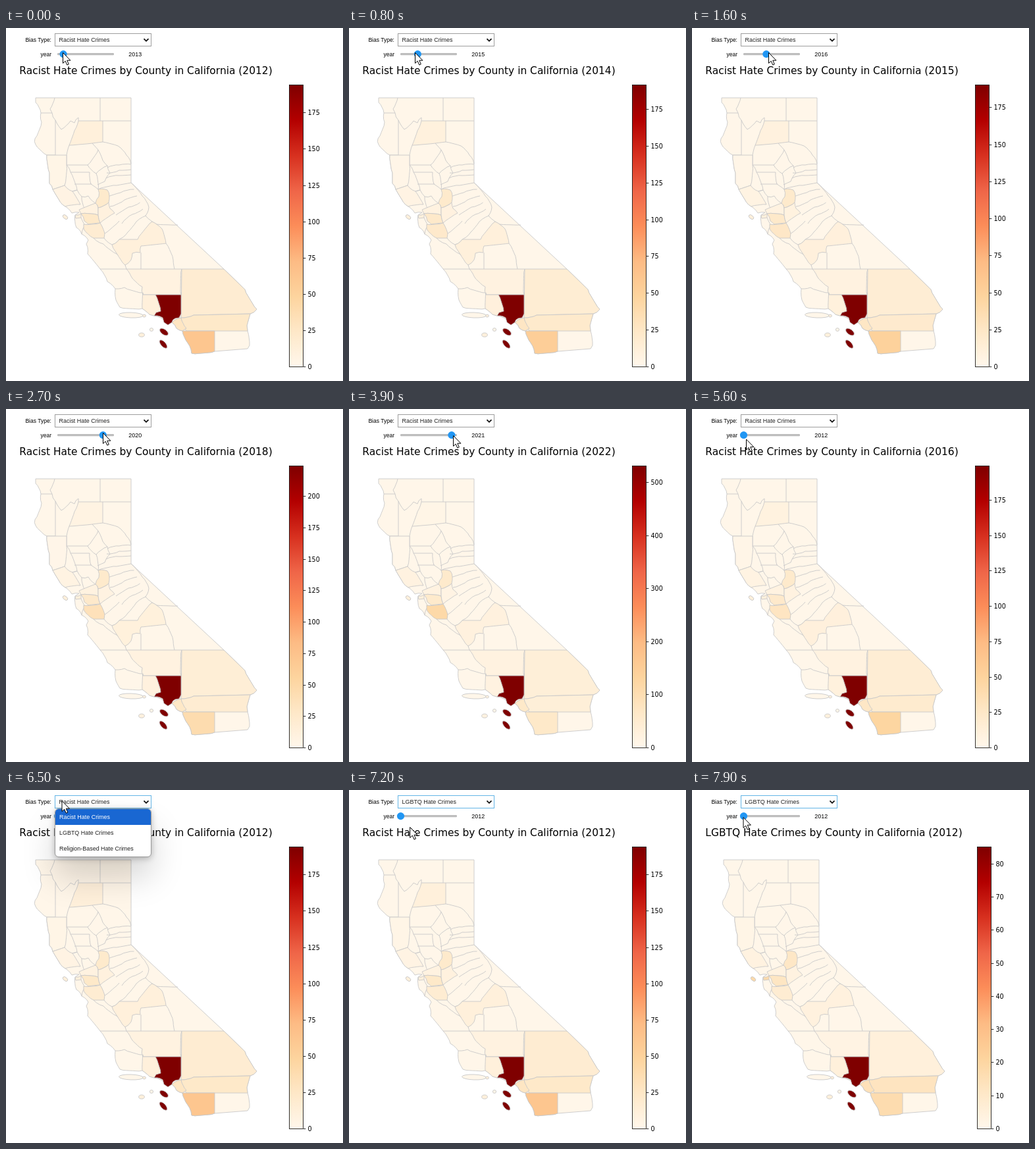
An HTML page that plays this animation: 512 by 536 pixels, repeating every 8000 ms.

```html
<!DOCTYPE html>
<html lang="en">
<head>
<meta charset="utf-8">
<title>County map</title>
<style>
  html, body { margin: 0; width: 100%; height: 100%; overflow: hidden; background: #fff; }
  svg { position: absolute; left: 0; top: 0; }
  .ui, .menu { font-family: "Liberation Sans", Arial, sans-serif; font-size: 8.95px; }
  .label { font-size: 8.5px; text-anchor: end; }
  .plot { font-family: "DejaVu Sans", sans-serif; font-size: 9.65px; }
  #title { font-size: 15.44px; text-anchor: middle; }
  #map { stroke: #c9c9c9; stroke-width: .9; stroke-linejoin: round; }
  .menu {
    position: absolute; left: 74px; top: 28px; width: 145px; height: 72px;
    border: .6px solid #999; border-radius: 6px; overflow: hidden; background: #fff;
    box-shadow: 0 30px 50px rgba(0, 0, 0, .17), 0 2px 10px rgba(0, 0, 0, .25);
  }
  .menu div { height: 24px; line-height: 24px; padding-left: 6px; color: #222; }
  .menu .on { background: #1967d2; color: #fff; }
</style>
</head>
<body>
<svg width="512" height="536" viewBox="0 0 512 536">
  <defs><linearGradient id="ramp" x1="0" y1="1" x2="0" y2="0"></linearGradient></defs>
  <g class="ui">
    <text class="label" x="69" y="21">Bias Type:</text>
    <text class="label" x="69" y="43">year</text>
    <rect id="box" x="74.5" y="8.5" width="146" height="19" fill="#fff"/>
    <text id="choice" x="80.5" y="21" fill="#222"></text>
    <path d="M209.5 16.3l3.5 3.5 3.5-3.5" fill="none" stroke="#111" stroke-width="1.8"/>
    <rect x="78" y="38" width="86" height="3.2" rx="1.2" fill="#bdbdbd"/>
    <circle id="knob" cy="39.6" r="5.6" fill="#2196f3"/>
    <text id="value" x="186.3" y="43"></text>
  </g>
  <g class="plot" id="plot">
    <text id="title" x="212.5" y="69.8"></text>
    <g id="map"></g>
    <rect x="430.5" y="86.5" width="21" height="428" fill="url(#ramp)" stroke="#000" stroke-width=".8"/>
    <g id="ticks"></g>
  </g>
</svg>
<div class="menu" id="menu"></div>
<svg width="512" height="536" viewBox="0 0 512 536">
  <path id="cursor" d="M0 0V16L3.7 12.7 6.3 18.6 8.8 17.5 6.3 11.7H11.4Z" fill="#fff" stroke="#000" stroke-width="1"/>
</svg>
<script>
const $ = id => document.getElementById(id);
const LOOP = 8000, STEP = 100;
const RELEASE = 5600, OPEN = 6400, HOVER = 6800, PICK = 7100, REDRAW = 7400;
const kinds = ['Racist', 'LGBTQ', 'Religion-Based'].map(k => k + ' Hate Crimes');
const mix = (a, b, k) => a + (b - a) * k;

// Linear interpolation through [position, ...values] keys, clamped at both ends.
function track(keys, at) {
  const i = keys.findIndex(k => k[0] > at);
  if (i < 1) return (i ? keys[keys.length - 1] : keys[0]).slice(1);
  const a = keys[i - 1], b = keys[i], k = (at - a[0]) / (b[0] - a[0]);
  return a.slice(1).map((v, n) => mix(v, b[n + 1], k));
}

const pointer = [[100, 86.5, 37.5], [1600, 116.5, 37.5], [2700, 147.5, 36.5], [3200, 166, 38], [3900, 158.5, 40.5],
  [RELEASE, 82.5, 46], [6200, 85, 16.5], [6600, 85, 16.5], [7000, 100, 64], [7600, 78, 41.5]];
const plotYear = [[0, 2012], [1600, 2015], [2700, 2018], [3800, 2022], [5600, 2016], [6400, 2012]];
const plotMax = [[2012, 194], [2015, 190], [2016, 199], [2018, 224], [2022, 531]];

const ramp = ['#fff7ec', '#fee8c8', '#fdd49e', '#fdbb84', '#fc8d59', '#ef6548', '#d7301f', '#b30000', '#7f0000'];
const rgb = hex => [1, 3, 5].map(i => parseInt(hex.slice(i, i + 2), 16));
const shade = percent =>
  `rgb(${track(ramp.map((c, i) => [i * 12.5, ...rgb(c)]), percent).map(Math.round)})`;

// Natural borders get a repeatable wobble; long or axis-aligned ones stay straight.
function edge(a, b) {
  const swap = a[0] > b[0], [p, q] = swap ? [b, a] : [a, b];
  const dx = q[0] - p[0], dy = q[1] - p[1], length = Math.hypot(dx, dy);
  if (!dx || !dy || length > 40) return [a];
  const n = Math.max(1, Math.round(length / 5)), inner = [];
  for (let i = 1; i < n; i++) {
    const noise = Math.sin(p[0] * 12.9 + p[1] * 78.2 + i * 37.7) * 1.2;
    inner.push([p[0] + dx * i / n - dy / length * noise, p[1] + dy * i / n + dx / length * noise]);
  }
  return [a, ...(swap ? inner.reverse() : inner)];
}
function shape(text, closed) {
  const pts = text.split(' ').map(p => p.split(',').map(Number));
  const next = i => pts[(i + 1) % pts.length];
  const out = pts.flatMap((p, i) => closed || i < pts.length - 1 ? edge(p, next(i)) : [p]);
  return `<path d="M${out.map(p => p.map(v => +v.toFixed(1))).join(' ')}${closed ? 'Z' : ''}"/>`;
}
const island = (x, y, rx, ry, turn = 0) =>
  `<ellipse rx="${rx}" ry="${ry}" transform="translate(${x} ${y}) rotate(${turn})"/>`;

const state = '45,106 190,106 190,235 331,366 363,397 381,427 371,434 366,452 367,460 370,482 367,487 317,491 '
  + '282,494 276,478 268,460 259,456 252,447 240,443 225,437 218,435 207,426 173,424 167,413 166,396 154,385 '
  + '143,366 124,343 122,328 125,322 115,313 107,303 105,284 111,280 100,281 90,271 80,260 71,245 66,236 66,220 '
  + '62,193 45,177 44,168 54,143 53,129 45,113';

// Outline, then the share of the maximum in 2012, in 2022 and for the second kind.
const counties = [
  ['62,193 92,193 92,208 89,239 71,245 66,236 66,220', 2, 1, 2],
  ['71,245 89,239 101,248 113,268 90,271 80,260', 3, 4, 4],
  ['110,141 147,141 147,173 131,175 96,178 104,156', 6, 2, 1],
  ['111,276 136,266 140,273 140,284 114,282', 4, 4, 4],
  ['114,282 140,284 143,296 125,298 119,293', 12, 11, 14],
  ['118,298 143,296 150,312 149,319 133,319 118,305', 9, 22, 9],
  ['140,245 154,246 157,255 156,265 140,273 136,266 141,256', 11, 11, 13],
  ['140,273 156,265 158,274 165,281 143,296 140,284', 5, 3, 4],
  ['105,284 114,282 114,288 106,289', 6, 6, 21, island(90, 287, 4.3, 2.6, 40)],
  ['161,329 172,321 200,321 222,294 237,305 243,327 205,331 204,341 192,342 190,352 181,360', 6, 5, 5],
  ['183,366 267,366 266,405 208,405 207,393 190,377', 4, 4, 3],
  ['208,402 208,405 227,405 235,430 225,437 218,435 207,426', 6, 4, 6, island(206, 466, 4.3, 3) + island(210, 437, 2.4, 2)],
  ['267,366 331,366 363,397 381,427 371,434 285,436 266,440', 9, 7, 6],
  ['266,440 285,436 371,434 366,452 367,460 274,460', 12, 7, 15],
  ['252,447 266,440 274,456 268,460 259,456', 14, 12, 17],
  ['268,460 317,460 317,491 282,494 276,478', 32, 12, 20],
  ['227,405 266,405 266,434 263,440 257,441 252,447 246,451 240,447 238,440 225,437 228,432 235,430', 100, 100, 100,
    island(240, 461.5, 7.4, 4, 36) + island(239, 480, 7.8, 3.6, 48)]
];

const borders = [
  '74,106 67,123 70,129 53,129', '70,129 75,140 75,193 62,193', '75,140 84,154 98,141 104,144 110,136 110,141',
  '143,106 143,141', '147,141 190,141', '96,178 92,193 92,208 98,219 108,246 101,248', '131,175 140,185 124,208 137,221',
  '140,185 147,201 154,209 137,221 140,245 129,237 127,219', '147,173 170,179 183,193 190,206',
  '139,238 150,233 158,220 154,209', '101,248 108,246 115,256 120,275', '115,256 125,255 136,266',
  '114,288 120,300 115,313', '150,312 172,293', '149,319 161,329 172,321 185,310', '190,235 207,255 217,272 212,285 229,298 261,299',
  '243,327 254,352 256,366', '205,341 205,366', '143,366 183,366 181,360 168,343 148,328 133,319', '166,396 180,394 208,402'
];
for (const [i, y] of [208, 219, 237].entries()) borders.push(`${92 + 6 * i},${y} ${124 + 3 * i},${y}`);
for (let i = 0; i < 3; i++) borders.push(`${154 - i},${212 + 8 * i} 172,${208 + 8 * i} 190,${207 + 8 * i}`);
for (let i = 0; i < 6; i++) borders.push(`${140 + 9 * i},${245 + 13 * i} ${168 + 6 * i},${239 + 11 * i} ${190 + 4.5 * i},${235 + 10 * i}`);

$('map').innerHTML = `<g fill="${shade(1)}">${shape(state, true)}${island(190, 436, 18.5, 4, 2)}${island(221, 458, 2.6, 2.4)}</g>`
  + `<g fill="none">${borders.map(b => shape(b)).join('')}</g>`
  + counties.map(([pts, , , , extra = '']) => `<g class="county">${shape(pts, true)}${extra}</g>`).join('');
const areas = document.querySelectorAll('.county');
$('ramp').innerHTML = ramp.map((c, i) => `<stop offset="${i / 8}" stop-color="${c}"/>`).join('');
$('menu').innerHTML = kinds.map(k => `<div>${k}</div>`).join('');

function drawPlot(kind, year) {
  const max = kind ? 85 : track(plotMax, year)[0];
  const gap = [10, 25, 50, 100].find(g => max / g < 9);
  $('title').textContent = `${kinds[kind]} by County in California (${year})`;
  $('plot').setAttribute('transform', `translate(${kind * 3})`);
  counties.forEach(([, first, last, other], i) =>
    areas[i].setAttribute('fill', shade(kind ? other : mix(first, last, (year - 2012) / 10))));
  let marks = '';
  for (let v = 0; v <= max; v += gap) {
    const y = Math.floor(514.5 - 427.5 * v / max) + .5;
    marks += `<path d="M452 ${y}h3.4" stroke="#000" stroke-width=".8"/><text x="458.4" y="${y + 3.5}">${v}</text>`;
  }
  $('ticks').innerHTML = marks;
}

let plotKey = '';
function draw(t) {
  const kind = t >= REDRAW ? 1 : 0, year = Math.round(track(plotYear, t)[0]);
  if (plotKey !== kind + ':' + year) {
    plotKey = kind + ':' + year;
    drawPlot(kind, year);
  }
  // The knob follows the pointer until it is let go at the left end.
  const notch = Math.round((track(pointer, Math.min(t, RELEASE))[0] - 78.5) / 8.6);
  $('value').textContent = 2012 + notch;
  $('knob').setAttribute('cx', 78.5 + notch * 8.6);
  $('choice').textContent = kinds[t >= PICK ? 1 : 0];
  $('box').setAttribute('stroke', t >= OPEN ? '#64b5e6' : '#9e9e9e');
  $('menu').style.display = t >= OPEN && t < PICK ? 'block' : 'none';
  [...$('menu').children].forEach((row, i) => { row.className = i === (t >= HOVER ? 1 : 0) ? 'on' : ''; });
  $('cursor').setAttribute('transform', `translate(${track(pointer, t)})`);
}

const start = performance.now();
let lastStep = -1;
function tick() {
  const step = Math.floor(((performance.now() - start) % LOOP) / STEP);
  if (step !== lastStep) draw((lastStep = step) * STEP);
  requestAnimationFrame(tick);
}
tick();
</script>
</body>
</html>
```
